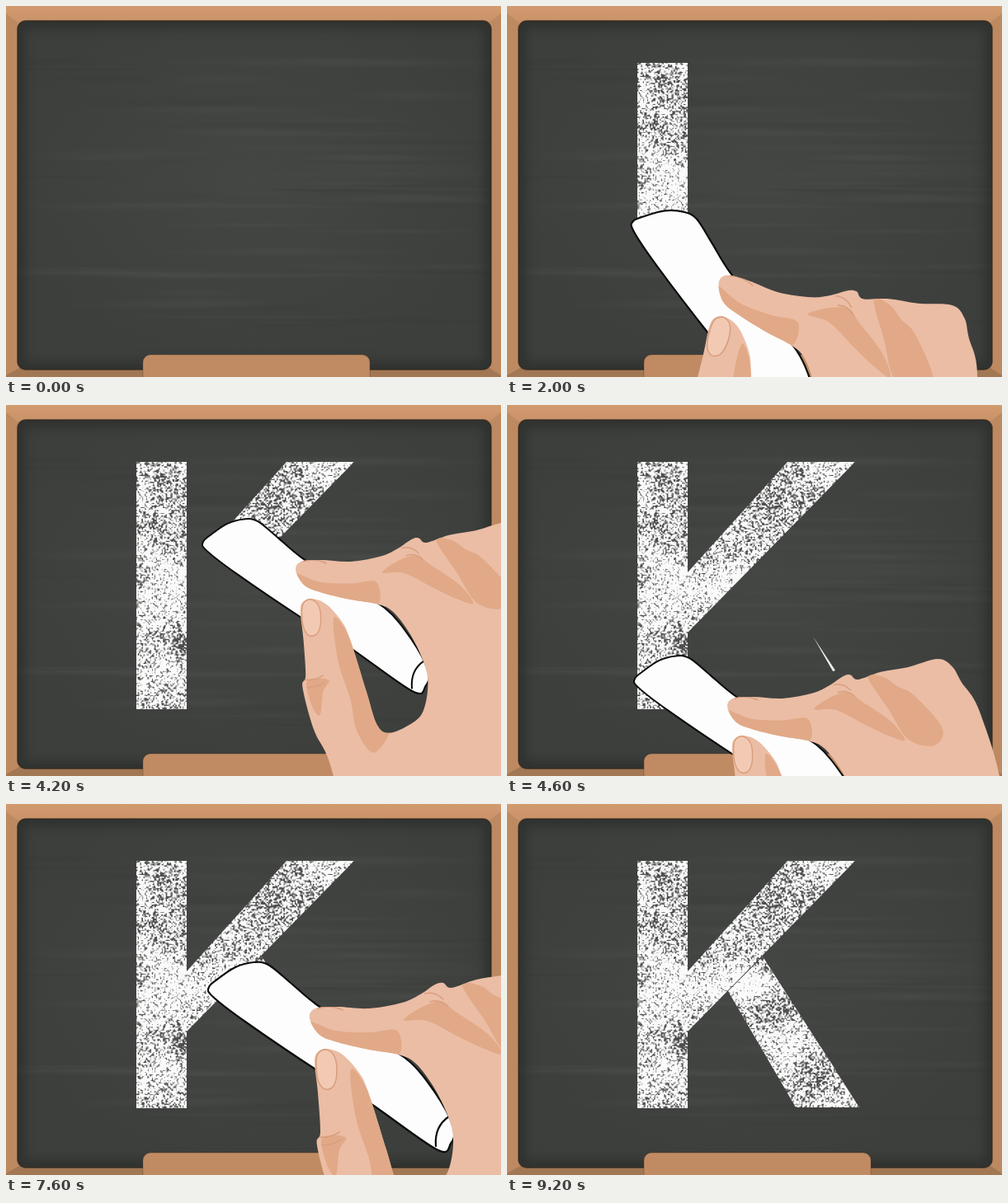
These frames come from a looping animation (600x450 px, 9.4 s). An HTML page with a canvas:

```html
<!DOCTYPE html>
<html lang="en">
<head>
<meta charset="utf-8">
<title>Letter K on a chalkboard</title>
<style>
html, body { margin: 0; width: 100%; height: 100%; overflow: hidden; background: #bd8961; }
canvas { display: block; }
</style>
</head>
<body>
<canvas id="stage" width="600" height="450"></canvas>
<script>
const W = 600, H = 450, LOOP = 9400, STEP = 200;
const ctx = document.getElementById('stage').getContext('2d');

let seed = 11;
function rand() {
  seed = (seed * 16807) % 2147483647;
  return seed / 2147483647;
}

function layer(draw) {
  const c = document.createElement('canvas');
  c.width = W;
  c.height = H;
  draw(c.getContext('2d'));
  return c;
}

function poly(p) {
  const path = new Path2D();
  for (let i = 0; i < p.length; i += 2) path.lineTo(p[i], p[i + 1]);
  path.closePath();
  return path;
}

// Closed smooth curve through the given points
function curve(p) {
  const n = p.length / 2, path = new Path2D();
  const at = i => [p[(i + n) % n * 2], p[(i + n) % n * 2 + 1]];
  path.moveTo(p[0], p[1]);
  for (let i = 0; i < n; i++) {
    const [a, b, c, d] = [at(i - 1), at(i), at(i + 1), at(i + 2)];
    path.bezierCurveTo(b[0] + (c[0] - a[0]) / 6, b[1] + (c[1] - a[1]) / 6,
      c[0] - (d[0] - b[0]) / 6, c[1] - (d[1] - b[1]) / 6, c[0], c[1]);
  }
  path.closePath();
  return path;
}

const board = layer(g => {
  const fill = (color, path) => { g.fillStyle = color; g.fill(path); };
  g.fillStyle = '#bd8961';
  g.fillRect(0, 0, W, H);
  const top = g.createLinearGradient(0, 0, 0, 20);
  top.addColorStop(0, '#d19a6f');
  top.addColorStop(1, '#c99268');
  fill(top, poly([0, 0, 600, 0, 600, 9, 586, 20, 14, 20, 0, 9]));
  fill('#a27753', poly([0, 450, 0, 448, 16, 439, 586, 439, 600, 448, 600, 450]));

  const slate = new Path2D();
  slate.roundRect(14, 18, 574, 423, 10);
  fill('#3d3f3c', slate);
  g.save();
  g.clip(slate);
  const glow = (x, y, rx, ry, color, alpha) => {
    const r = g.createRadialGradient(0, 0, 0, 0, 0, 1);
    r.addColorStop(0, `rgba(${color},${alpha})`);
    r.addColorStop(1, `rgba(${color},0)`);
    g.save();
    g.translate(x, y);
    g.scale(rx, ry);
    g.fillStyle = r;
    g.fillRect(-1, -1, 2, 2);
    g.restore();
  };
  glow(300, 210, 310, 230, '76,78,75', .5);
  for (let i = 0; i < 60; i++) {
    glow(60 + rand() * 480, 60 + rand() * 330, 70 + rand() * 130, 2 + rand() * 6,
      i % 3 ? '100,102,98' : '40,42,39', .12);
  }
  g.filter = 'blur(7px)';
  g.strokeStyle = 'rgba(38,40,37,.65)';
  g.lineWidth = 16;
  g.stroke(slate);
  g.restore();
  g.strokeStyle = 'rgba(45,37,30,.75)';
  g.lineWidth = 1.5;
  g.stroke(slate);

  g.beginPath();
  g.roundRect(166, 423, 275, 40, 9);
  g.fillStyle = '#c08b63';
  g.fill();
  g.strokeStyle = 'rgba(90,62,42,.35)';
  g.lineWidth = 1;
  g.stroke();
});

// Smooth value noise with the given cell size
function noise(cell) {
  const cols = Math.ceil(W / cell) + 2;
  const grid = Array.from({ length: cols * (Math.ceil(H / cell) + 2) }, rand);
  return (x, y) => {
    const u = x / cell, v = y / cell, i = Math.floor(u), j = Math.floor(v);
    const a = u - i, b = v - j, k = j * cols + i;
    return (grid[k] * (1 - a) + grid[k + 1] * a) * (1 - b) +
      (grid[k + cols] * (1 - a) + grid[k + cols + 1] * a) * b;
  };
}

// Dark (positive) and bright (negative) patches: x, y, radius, amount
const patches = [
  [190, 95, 22, .1], [185, 148, 24, .15], [175, 185, 24, -.12], [208, 210, 18, -.1],
  [175, 252, 26, -.1], [213, 293, 13, .28], [200, 335, 25, -.12], [205, 358, 16, .08],
  [388, 78, 26, -.1], [325, 112, 26, .12], [252, 183, 20, .08], [270, 212, 28, -.12],
  [298, 215, 20, -.2], [332, 248, 20, .14], [335, 305, 26, -.12], [376, 332, 22, .18]
];

const chalkDust = layer(g => {
  const img = g.createImageData(W, H), grain = noise(1.7), cloud = noise(28);
  for (let y = 66; y < 372; y++) {
    for (let x = 155; x < 430; x++) {
      let cut = .26 + .2 * cloud(x, y);
      for (const [px, py, r, amount] of patches) {
        cut += amount * Math.exp(-((x - px) ** 2 + (y - py) ** 2) / (r * r));
      }
      const v = Math.max(0, Math.min(1, (grain(x, y) - cut) * 2.6 + .55));
      const k = (y * W + x) * 4;
      img.data[k] = img.data[k + 1] = img.data[k + 2] = 78 + 172 * v;
      img.data[k + 3] = 255;
    }
  }
  g.putImageData(img, 0, 0);
});

const sliver = poly([371, 281, 398, 322, 395, 323]);

// tip: chalk corner at time `at`; speed in px per step; lead: how far the line is drawn past the tip
const strokes = [
  { shape: poly([158, 69, 219, 69, 219, 369, 158, 369]),
    start: 1600, at: 2000, tip: [153, 261], speed: [0, 83], turn: 18.5, size: 1, lead: 2 },
  { shape: poly([340, 69, 422, 69, 219, 276, 219, 203]),
    start: 4000, at: 4200, tip: [239, 166], speed: [-75, 83], turn: 0, size: .92, lead: -6, minX: 155 },
  { shape: poly([268, 227, 310, 185, 427, 368, 350, 368]),
    start: 7400, at: 7600, tip: [246, 222], speed: [53, 83], turn: 0, size: 1, lead: 42 }
];

const chalk = curve([246, 222, 257, 212, 278, 198, 300, 192, 318, 195, 345, 217, 376, 243,
  430, 278, 485, 309, 520, 350, 542, 392, 539, 412, 522, 419, 440, 362, 380, 325, 290, 264, 250, 233]);
const chalkEnd = new Path2D('M521 415 Q519 391 537 379');
const hand = curve([368, 260, 375, 248, 402, 246, 440, 248, 480, 241, 502, 231, 520, 219, 530, 217,
  540, 223, 570, 213, 605, 207, 645, 196, 664, 206, 676, 226, 702, 270, 735, 400, 760, 700,
  450, 700, 417, 528, 392, 470, 377, 414, 381, 398, 378, 350, 374, 312, 379, 300, 390, 297,
  408, 304, 428, 326, 439, 349, 461, 419, 475, 463, 491, 474, 518, 463, 535, 447, 542, 414,
  538, 385, 520, 346, 497, 315, 476, 304, 440, 298, 402, 289, 380, 280]);
const shades = [
  [369, 264, 400, 275, 440, 277, 474, 275, 476, 304, 440, 298, 402, 289, 380, 280],
  [482, 262, 505, 246, 528, 240, 545, 252, 583, 278, 602, 303, 580, 297, 548, 282, 522, 268, 505, 262],
  [553, 220, 574, 220, 592, 232, 614, 244, 651, 287, 640, 310, 606, 302, 580, 262],
  [418, 322, 439, 349, 461, 419, 475, 463, 491, 474, 470, 500, 448, 470, 440, 430, 424, 380],
  [382, 408, 396, 402, 412, 405, 404, 420, 400, 450, 390, 440]
].map(curve);
const nail = curve([376, 318, 378, 303, 388, 298, 398, 306, 401, 325, 397, 342, 387, 346, 379, 337]);
const creases = new Path2D('M508 230Q520 227 530 237M514 240Q525 236 535 245M380 404Q394 405 404 398M383 414Q396 414 406 407M378 248Q393 243 408 250');

function drawHand(x, y, s) {
  ctx.save();
  ctx.translate(x, y);
  ctx.rotate(s.turn * Math.PI / 180);
  ctx.scale(s.size, s.size);
  ctx.translate(-246, -222);
  ctx.lineJoin = ctx.lineCap = 'round';
  ctx.fillStyle = '#fdfdfd';
  ctx.fill(chalk);
  ctx.strokeStyle = '#0c0c0c';
  ctx.lineWidth = 2.2;
  ctx.stroke(chalk);
  ctx.stroke(chalkEnd);
  ctx.fillStyle = '#ebbda5';
  ctx.fill(hand);
  ctx.clip(hand);
  ctx.fillStyle = '#e1a987';
  shades.forEach(p => ctx.fill(p));
  ctx.fillStyle = '#f2cab4';
  ctx.fill(nail);
  ctx.strokeStyle = '#d99f7e';
  ctx.lineWidth = 1.6;
  ctx.stroke(nail);
  ctx.stroke(creases);
  ctx.restore();
}

function drawStroke(s, front) {
  ctx.save();
  ctx.beginPath();
  ctx.rect(0, 0, W, front);
  ctx.clip();
  ctx.clip(s.shape);
  ctx.drawImage(chalkDust, 0, 0);
  ctx.restore();
}

function render(t) {
  ctx.drawImage(board, 0, 0);
  if (t >= 4400) {
    ctx.fillStyle = '#eee';
    ctx.fill(sliver);
  }
  let held = null;
  for (const s of strokes) {
    if (t < s.start) continue;
    const n = (t - s.at) / STEP;
    const x = Math.max(s.minX || 0, s.tip[0] + s.speed[0] * n);
    const y = s.tip[1] + s.speed[1] * n;
    drawStroke(s, y + s.lead);
    if (y < H + 30) held = [x, y, s];
  }
  if (held) drawHand(...held);
}

const begin = performance.now();
function tick() {
  const t = (performance.now() - begin) % LOOP;
  render(Math.floor(t / STEP) * STEP);
  requestAnimationFrame(tick);
}
tick();
</script>
</body>
</html>
```
